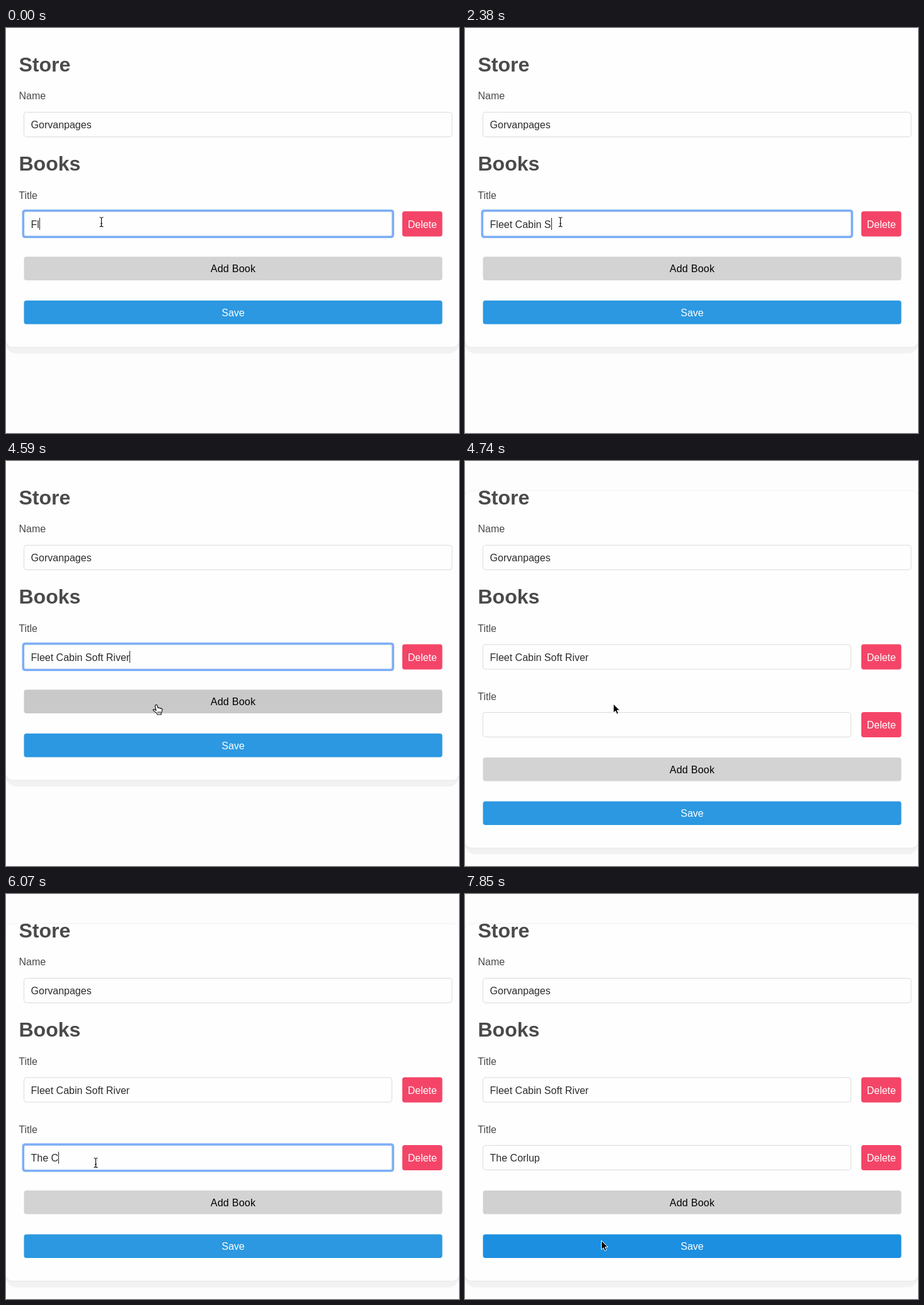
Recreate the animation shown at these times as an HTML page. Size 719 by 642 pixels, loop 8000 ms.

```html
<!DOCTYPE html>
<html lang="en">
<head>
<meta charset="utf-8">
<title>Store form</title>
<style>
  html, body { margin: 0; width: 100%; height: 100%; overflow: hidden; background: #fdfdfd; }
  svg { display: block; }
  text { font: 16px "Liberation Sans", Arial, sans-serif; fill: #4a4a4a; white-space: pre; }
  .head { font-size: 32px; font-weight: bold; }
  .value { fill: #2c2c2c; }
  .mid { text-anchor: middle; }
  .light { fill: #fff; }
  .box { fill: #fefefe; stroke: #dbdbdb; }
  .ring { fill: none; stroke: #7caef7; stroke-width: 3.6; }
  .caret { fill: #222; }
</style>
</head>
<body>
<svg id="stage" width="719" height="642" viewBox="0 0 719 642"></svg>
<script>
const LOOP = 8000, ROW = 107.5;
const STORE = "Gorvanpages";
const TITLES = ["Fleet Cabin Soft River", "The Corlup"];

// [time, letters shown]
const TYPED = [
  [[0, 2], [300, 3], [440, 5], [590, 6], [890, 7], [1040, 8], [1190, 9], [1630, 10],
   [1780, 11], [1930, 12], [2230, 13], [2680, 14], [2830, 15], [3120, 16], [3270, 18],
   [3410, 19], [3560, 20], [3710, 21], [3860, 22]],
  [[0, 0], [5480, 1], [5630, 2], [5770, 3], [5920, 4], [6070, 5], [6220, 6], [6360, 7],
   [6510, 9], [6660, 10]]
];
// [time, focused row]
const FOCUS = [[0, 0], [4740, -1], [5180, 1], [7850, -1]];
const ROWS = [[0, 1], [4740, 2]];
const ADD = [[0, "#d3d3d3"], [4450, "#cecece"], [4590, "#c9c9c9"], [4740, "#d3d3d3"],
  [7400, "#cccccc"], [7700, "#cfcfcf"], [7850, "#d1d1d1"]];
const SAVE = [[0, "#2b98e1"], [7700, "#2493e0"], [7850, "#1d8fe0"]];
// [time, shape, x, y]
const POINTER = [
  [0, "beam", 151.5, 307.5], [4160, "beam", 158, 314], [4310, "arrow", 185, 341],
  [4450, "hand", 225, 375], [4590, "hand", 236, 386], [4740, "arrow", 235.5, 385],
  [4890, "arrow", 220, 390], [5030, "beam", 168, 415], [5180, "beam", 142.5, 426],
  [6960, "beam", 143, 428], [7110, "beam", 147, 434], [7250, "arrow", 160, 452],
  [7400, "hand", 182, 483], [7550, "arrow", 204, 525], [7700, "hand", 215, 547],
  [7850, "arrow", 216.5, 549.5]
];

const rect = (x, y, w, h, attrs = "", r = 4) =>
  `<rect x="${x}" y="${y}" width="${w}" height="${h}" rx="${r}" ${attrs}/>`;
const text = (x, y, str, cls = "", attrs = "") =>
  `<text x="${x}" y="${y}" class="${cls}" ${attrs}>${str}</text>`;

const bookRow = i => `
  <g id="row${i}" transform="translate(0 ${i * ROW})">
    ${text(20.3, 271, "Title")}
    ${rect(28.5, 291, 584, 39, 'class="box"')}
    ${rect(27.3, 289.5, 587, 41.8, `class="ring" id="ring${i}"`, 3)}
    ${text(39.6, 316.6, "", "value", `id="title${i}"`)}
    ${rect(0, 301, 1, 19, `class="caret" id="caret${i}"`, 0)}
    ${rect(629, 290.5, 63.5, 40, 'fill="#f44568"')}
    ${text(660.8, 316.6, "Delete", "mid light")}
  </g>`;

const beam = "M-3 -7.5Q-.5 -7.5 0 -6Q.5 -7.5 3 -7.5M0 -6V6M-3 7.5Q-.5 7.5 0 6Q.5 7.5 3 7.5M-1.5 2.5H1.5";
const hand = "M1.2 1.2C2.4 -.2 3.9 .5 4.2 2L5.2 5.6C5.6 4.7 7.4 4.7 7.7 6C8.3 5.2 9.8 5.5 10 6.7" +
  "C10.9 6.2 12 6.9 12 8.1C12 10.8 11.3 12 10.3 13.7L10.2 16H4.3C3.9 14 1.7 12.4 -1.8 9.7" +
  "C-3.3 8.4 -1.7 7 -.3 7.8L2.2 9.5L.8 3.1Q.6 1.9 1.2 1.2Z";

document.getElementById("stage").innerHTML = `
  <defs><filter id="soft" x="-5%" y="-5%" width="110%" height="110%">
    <feGaussianBlur stdDeviation="1"/></filter></defs>
  <g id="card">
    ${rect(0, -60, 719, 576, 'fill="#f2f2f2"', 16)}
    ${rect(0, -60, 719, 566.5, 'fill="#e8e8e8" filter="url(#soft)"', 10)}
    ${rect(0, -60, 719, 565.5, 'fill="#fefefe"', 10)}
  </g>
  ${text(20.5, 69, "Store", "head")}
  ${text(20.5, 113, "Name")}
  ${rect(28.5, 133.5, 679.5, 39, 'class="box"')}
  ${text(39.6, 159, STORE, "value")}
  ${text(20.5, 226, "Books", "head")}
  ${bookRow(0)}${bookRow(1)}
  <g id="actions">
    ${rect(28.5, 362.5, 664, 37.5, 'id="add"')}
    ${text(360.5, 387, "Add Book", "mid", 'style="fill:#000;letter-spacing:.28px"')}
    ${rect(28.5, 432, 664, 37.5, 'id="save"')}
    ${text(360.5, 456.6, "Save", "mid light")}
  </g>
  <g id="beam" fill="none">
    <path d="${beam}" stroke="#fff" stroke-width="2.6"/>
    <path d="${beam}" stroke="#111" stroke-width="1.2"/>
  </g>
  <path id="arrow" d="M0 0V14.2L3.3 11.2L5.5 16.2L8 15.1L5.8 10.2H10.2Z"
    fill="#000" stroke="#fff" stroke-width="1"/>
  <g id="hand">
    <path d="${hand}" fill="#fff" stroke="#111" stroke-width="1.2" stroke-linejoin="round"/>
    <path d="M5 11V14M7 11V14M9 11V14" stroke="#111" stroke-width=".9"/>
  </g>`;

const el = id => document.getElementById(id);
const show = (id, on) => el(id).setAttribute("visibility", on ? "visible" : "hidden");
const at = (table, t) => table.findLast(step => step[0] <= t);

function draw(t) {
  const rows = at(ROWS, t)[1];
  const focus = at(FOCUS, t)[1];
  const shift = `translate(0 ${(rows - 1) * ROW})`;
  el("card").setAttribute("transform", shift);
  el("actions").setAttribute("transform", shift);
  el("row1").style.display = rows > 1 ? "" : "none";

  TITLES.forEach((title, i) => {
    const label = el("title" + i);
    const shown = title.slice(0, at(TYPED[i], t)[1]);
    if (label.textContent !== shown) label.textContent = shown;
    show("ring" + i, focus === i);
    show("caret" + i, focus === i);
    if (focus === i) {
      const width = shown ? label.getComputedTextLength() : 0;
      el("caret" + i).setAttribute("x", Math.round(39.8 + width));
    }
  });

  el("add").setAttribute("fill", at(ADD, t)[1]);
  el("save").setAttribute("fill", at(SAVE, t)[1]);

  const [, shape, x, y] = at(POINTER, t);
  for (const id of ["beam", "arrow", "hand"]) show(id, id === shape);
  el(shape).setAttribute("transform", `translate(${x} ${y})`);
}

function tick() {
  draw(performance.now() % LOOP);
  requestAnimationFrame(tick);
}
tick();
</script>
</body>
</html>
```
